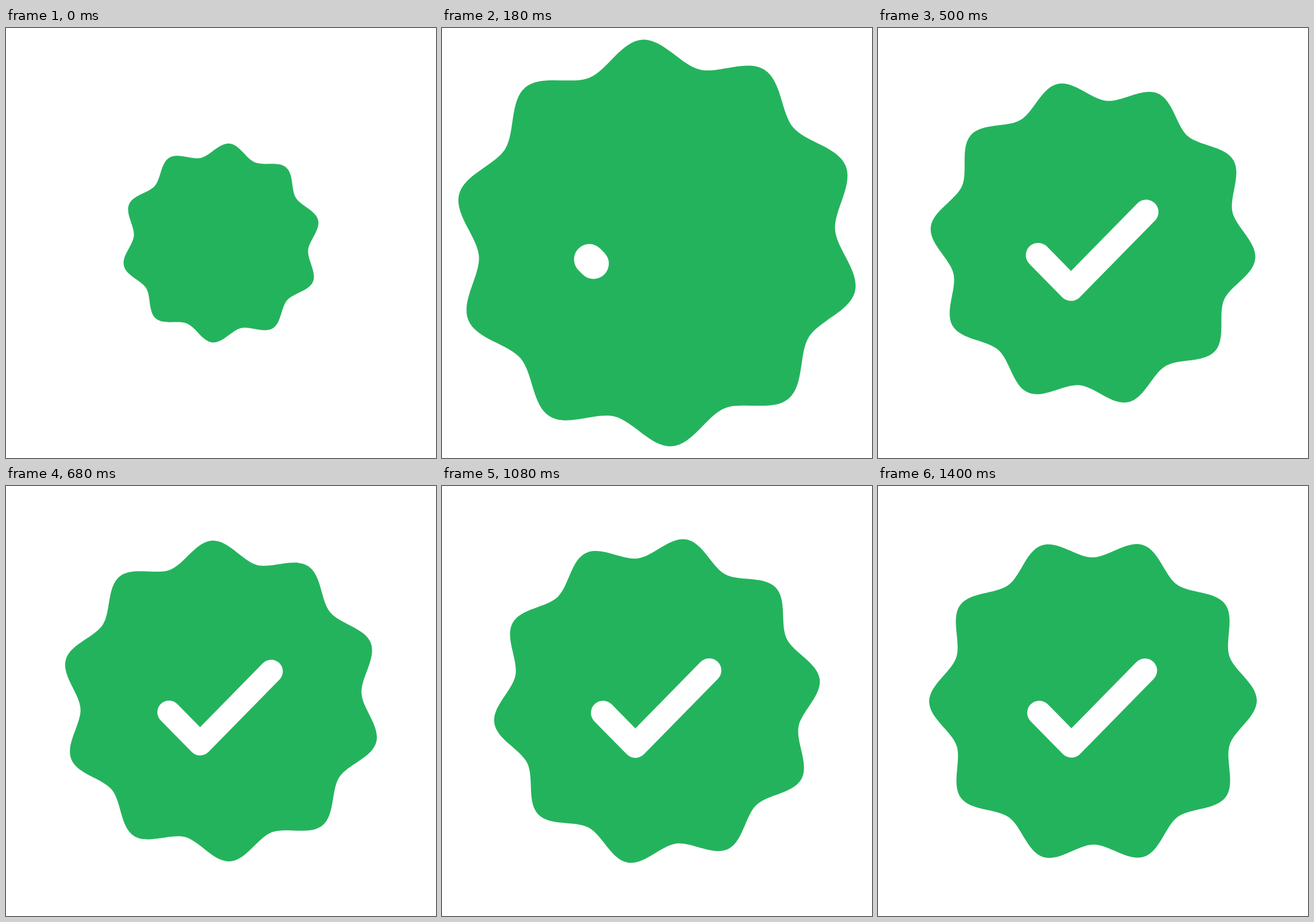
Recreate the animation shown at these times as an HTML page. Size 748 by 748 pixels, loop 1420 ms.

```html
<!DOCTYPE html>
<html lang="en">
<head>
<meta charset="utf-8">
<title>Badge</title>
<style>
  html, body { margin: 0; width: 100%; height: 100%; overflow: hidden; background: #fff; }
  svg { display: block; width: 100%; height: 100%; }
</style>
</head>
<body>
<svg viewBox="0 0 748 748">
  <path id="badge" fill="#24b35d"/>
  <path id="check" d="M-89.5 29.5L-33.5 86.5L94.5 -44" fill="none" stroke="#fff" stroke-width="42"
        stroke-linecap="round" stroke-linejoin="round" pathLength="1"/>
</svg>
<script>
const LOOP = 1420, STEP = 20;
const LOBES = 10;
const CREST = { r: 285, handle: 29 }, TROUGH = { r: 249.7, handle: 27 };
const DRAW_START = 160, DRAW_TIME = 190;

const badge = document.getElementById('badge');
const check = document.getElementById('check');

// Damped spring around 1, first crossing it at time `cross`
const spring = (t, cross, amp, decay) =>
  1 + amp * Math.exp(-decay * t) * Math.sin(.0074 * (t - cross));

const badgeScale = t => spring(t, 63, .87, .00555);
const checkScale = t => spring(t, 105.5, 1.32, .00522);

// A fast spin that dies away into a slow steady turn
const turn = t => .017 * t + 62.7 * (1 - Math.exp(-t / 375)) - 85.2;

const drawn = t => {
  const u = Math.min(1, Math.max(0, (t - DRAW_START) / DRAW_TIME));
  return u * u * (3 - 2 * u);
};

// Wavy disc: crests and troughs joined by curves with tangential handles
function badgePath() {
  const point = (i, side) => {
    const { r, handle } = i % 2 ? TROUGH : CREST;
    const a = i * Math.PI / LOBES, c = Math.cos(a), s = Math.sin(a), h = side * handle;
    return `${(r * c - h * s).toFixed(2)} ${(r * s + h * c).toFixed(2)}`;
  };
  let d = 'M' + point(0, 0);
  for (let i = 0; i < LOBES * 2; i++) {
    d += `C${point(i, 1)} ${point(i + 1, -1)} ${point(i + 1, 0)}`;
  }
  return d + 'Z';
}

function render(t) {
  const part = drawn(t);
  badge.setAttribute('transform', `translate(374 374) rotate(${turn(t)}) scale(${badgeScale(t)})`);
  check.setAttribute('transform', `translate(370 365) scale(${checkScale(t)})`);
  check.setAttribute('visibility', part > 0 ? 'visible' : 'hidden');
  check.setAttribute('stroke-dasharray', part < 1 ? `${part} 2` : 'none');
}

badge.setAttribute('d', badgePath());
render(0);

let start;
function tick(now) {
  start ??= now;
  const t = (now - start) % LOOP;
  render(Math.floor(t / STEP) * STEP);
  requestAnimationFrame(tick);
}
requestAnimationFrame(tick);
</script>
</body>
</html>
```
